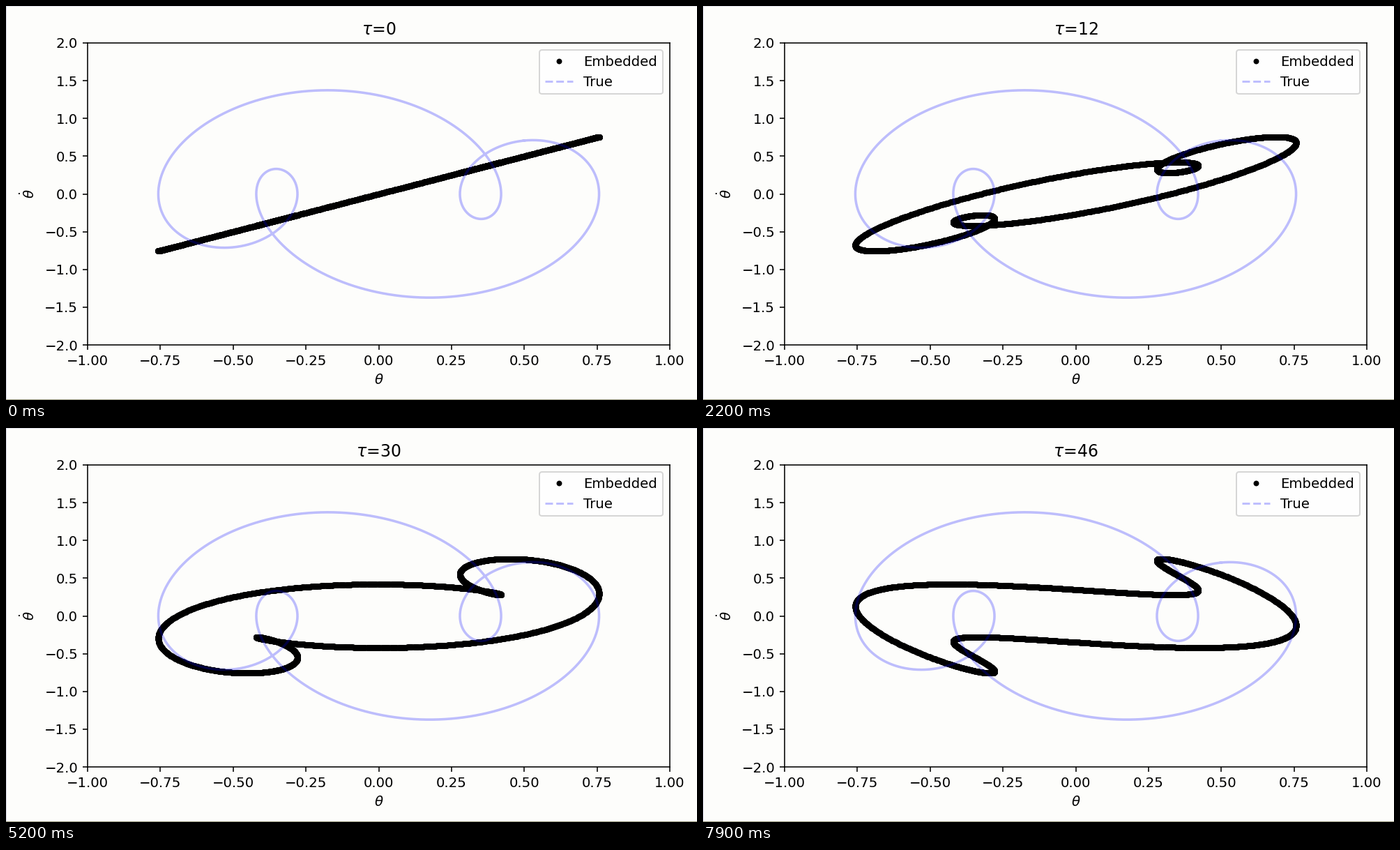
These frames come from a looping animation (991x565 px, 8 s). A matplotlib script:

```python
import numpy as np
import matplotlib.pyplot as plt
from matplotlib.animation import FuncAnimation
from matplotlib.lines import Line2D
from matplotlib.patches import Rectangle

W, H, DPI = 991, 565, 142
FRAMES, INTERVAL = 80, 100
HOLD = 1.7        # frames spent on each delay
DT = 0.02         # time per unit of delay
OMEGA = 1.005
PAPER = "#fdfdfb"

# odd harmonics of the periodic swing: (order, cosine, sine)
HARMONICS = [(1, 0.6009, 0.0), (3, -0.1053, 0.2410), (5, 0.0028, -0.0041)]


def theta(p):
    return sum(a * np.cos(k * p) + b * np.sin(k * p) for k, a, b in HARMONICS)


def theta_dot(p):
    return OMEGA * sum(k * (b * np.cos(k * p) - a * np.sin(k * p))
                       for k, a, b in HARMONICS)


plt.rcParams["font.family"] = "DejaVu Sans"
fig = plt.figure(figsize=(W / DPI, H / DPI), dpi=DPI, facecolor=PAPER)
ax = fig.add_axes([117 / W, 1 - 486 / H, 835 / W, 433 / H], facecolor=PAPER)

phase = np.linspace(0, 2 * np.pi, 1600)
x = theta(phase)

embedded, = ax.plot(x, x, "k.", ms=7)
ax.plot(x, theta_dot(phase), "b-", lw=1.8, alpha=0.25)

ax.set_xlim(-1, 1)
ax.set_ylim(-2, 2)
ax.set_xticks(np.linspace(-1, 1, 9))
ax.set_yticks(np.linspace(-2, 2, 9))
ax.set_xlabel(r"$\theta$")
ax.set_ylabel(r"$\dot{\theta}$", labelpad=5)
title = ax.set_title("")

keys = [Line2D([], [], color="k", marker=".", ls="", label="Embedded"),
        Line2D([], [], color="b", ls="--", alpha=0.25, label="True")]
ax.legend(handles=keys, loc="upper right")


def edge(left, bottom, width, height, color):
    fig.add_artist(Rectangle((left / W, bottom / H), width / W, height / H,
                             transform=fig.transFigure, fc=color, lw=0,
                             antialiased=False))


# thin rules along the stage border
edge(0, H - 1, W, 1, "#e2e2ea")
edge(0, 0, 1, H, "#d8d8e6")
edge(0, 0, W, 1, "#98987e")


def update(i):
    tau = int(i / HOLD)
    embedded.set_data(x, theta(phase + OMEGA * DT * tau))
    title.set_text(rf"$\tau$={tau}")
    return embedded, title


anim = FuncAnimation(fig, update, frames=FRAMES, interval=INTERVAL,
                     repeat=True, repeat_delay=0, blit=False)
plt.show()
```
